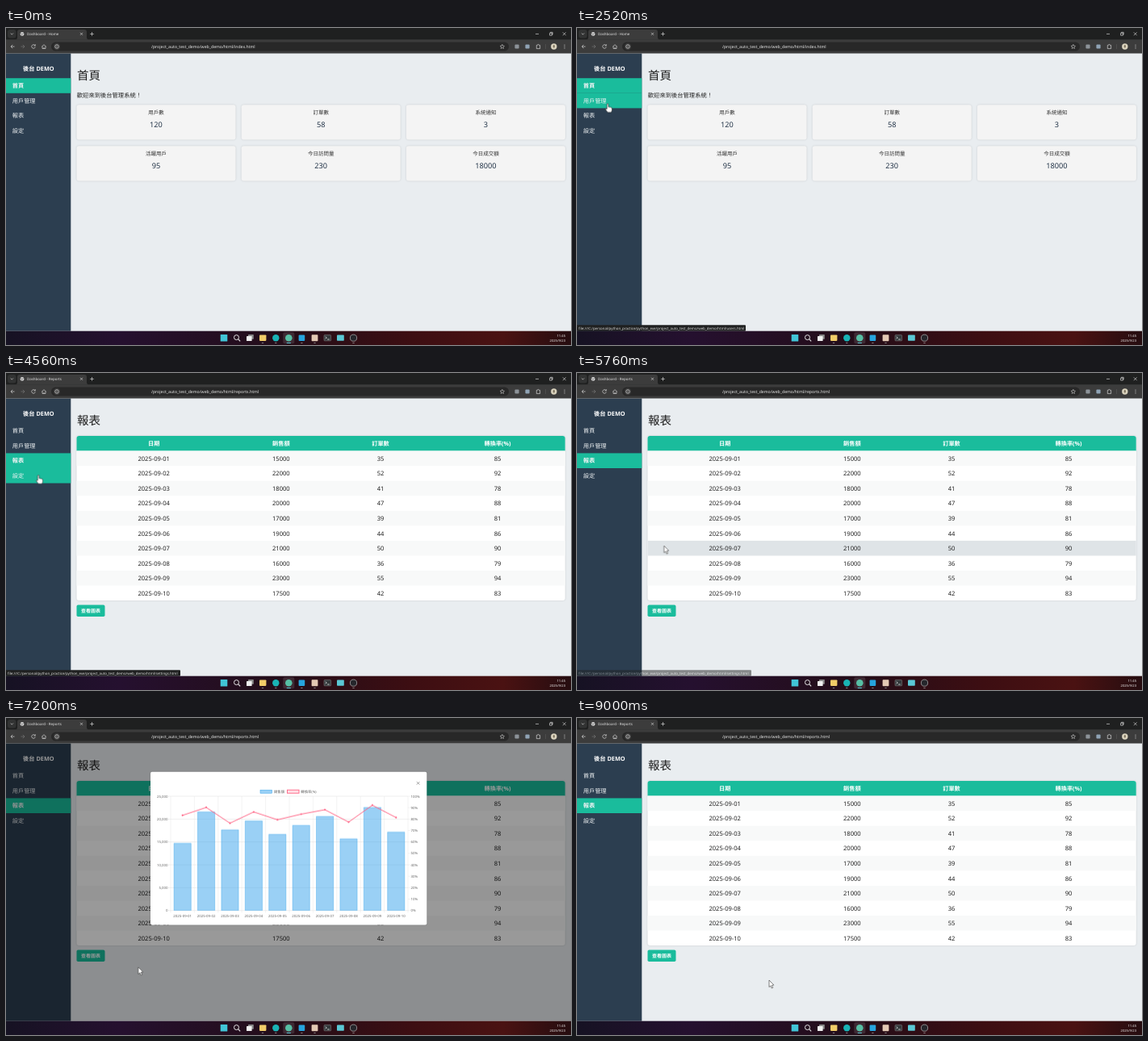
An HTML page for the animation above (9120 ms loop, 700 px wide and 393 px high).

```html
<!DOCTYPE html>
<html lang="zh-Hant">
<head>
<meta charset="utf-8">
<title>Dashboard demo</title>
<style>
  html, body { margin: 0; width: 100%; height: 100%; overflow: hidden; background: #e9edf0; }
  svg { display: block; width: 100vw; height: 100vh; }
  text { font-family: "Noto Sans", "Noto Sans CJK TC", "Noto Sans CJK", sans-serif; text-rendering: geometricPrecision; white-space: pre; }
  .shadow { filter: drop-shadow(0 .8px 1px rgba(0, 0, 0, .14)); }
  .plot { transform-origin: 0 238.7px; }
  .plot * { vector-effect: non-scaling-stroke; }
</style>
</head>
<body>
<svg id="stage" viewBox="0 0 700 393" preserveAspectRatio="none"></svg>
<script>
const LOOP = 9120;
const TEAL = '#1abc9c';
const styles = [];
const range = n => [...Array(n).keys()];

// Declares a looping track from [ms, css] keys and returns its style attribute.
function track(name, keys, timing = 'step-end') {
  const body = keys.map(([ms, css]) => `${(ms / LOOP * 100).toFixed(4)}%{${css}}`).join('');
  styles.push(`@keyframes ${name}{${body}}`);
  return `style="animation:${name} ${LOOP}ms ${timing} infinite"`;
}

// Visible only inside the given [from, to] spans.
function shown(name, ...spans) {
  const keys = [[0, 'opacity:0']];
  for (const [from, to] of spans) {
    keys.push([from, 'opacity:1']);
    if (to < LOOP) keys.push([to, 'opacity:0']);
  }
  return track(name, keys.filter(([ms], i) => i || spans[0][0] > 0));
}

const group = (attrs, ...parts) => `<g ${attrs}>${parts.flat().join('')}</g>`;
const rect = (x, y, w, h, fill, r = 0, more = '') =>
  `<rect x="${x}" y="${y}" width="${w}" height="${h}" fill="${fill}" rx="${r}" ${more}/>`;
const circle = (x, y, r, fill, more = '') => `<circle cx="${x}" cy="${y}" r="${r}" fill="${fill}" ${more}/>`;
const line = (d, color = '#d4d4d4', width = .7) =>
  `<path d="${d}" fill="none" stroke="${color}" stroke-width="${width}"/>`;
// Text centred vertically on y.
const text = (str, x, y, size, fill, anchor = 'start', weight = 400) =>
  `<text x="${x}" y="${(y + size * .37).toFixed(2)}" font-size="${size}" fill="${fill}" text-anchor="${anchor}" font-weight="${weight}">${str}</text>`;

const HOME_SPAN = [0, 3180];
const REPORT_SPAN = [3180, LOOP];
const LOAD_SPAN = [3180, 3400];

function browser() {
  const tabTitle = str => text(str, 26, 7.4, 4.45, '#e4e4e4');
  const path = page => text(`/project_auto_test_demo/web_demo/html/${page}.html`, 180, 23, 5.15, '#e6e6e6');
  return [
    rect(0, 0, 700, 15, '#1f2020'),
    rect(2, 2, 10.5, 10.5, '#323333', 3), line('M5.7 6.5l1.6 1.6l1.6-1.6'),
    '<path d="M11 14.5q3 0 3-3V5q0-3 3-3H97q3 0 3 3v6.5q0 3 3 3z" fill="#3c3c3c"/>',
    rect(0, 14.3, 700, 17.2, '#3c3c3c'),
    circle(20, 7.4, 2.4, '#d8d8d8'), line('M18 6.5l2 1l1.8-1M19 9.2l1.3-1.4', '#555', .6),
    group(shown('tabHome', HOME_SPAN), tabTitle('Dashboard - Home')),
    group(shown('tabLoad', LOAD_SPAN), tabTitle('reports.html')),
    group(shown('tabReports', [LOAD_SPAN[1], LOOP]), tabTitle('Dashboard - Reports')),
    line('M92 5.8l3 3m0-3l-3 3M104.2 7.4h4.6m-2.3-2.3v4.6'),
    line('M656 7.4h4M673.6 6.3h2.8v2.8h-2.8zM674.4 6.1v-.8h2.8v2.8h-.8M689.8 5.4l3.8 3.8m0-3.8l-3.8 3.8'),
    line('M10.5 23H6m2.2-2.2L6 23l2.2 2.2'),
    line('M18.5 23H23m-2.2-2.2L23 23l-2.2 2.2', '#777'),
    group(shown('reload', [0, LOAD_SPAN[0]], [LOAD_SPAN[1], LOOP]),
      line('M36 21.7a2.3 2.3 0 1 0 .3 1.8M36.3 20.2v1.8h-1.8')),
    group(shown('stop', LOAD_SPAN), line('M32.3 21.2l3.6 3.6m0-3.6l-3.6 3.6')),
    line('M45 22.5v3h4v-3M44.4 23l2.6-2.3l2.6 2.3M47 25.5v-1.6'),
    rect(56, 17.4, 567, 11.2, '#282828', 5.6),
    circle(63, 23, 4.2, '#3b3b3b'), circle(63, 23, 2.3, 'none', 'stroke="#d4d4d4" stroke-width=".7"'),
    line('M63 22.7v1.4M63 21.5v.6', '#d4d4d4', .6),
    group(shown('pathHome', HOME_SPAN), path('index')),
    group(shown('pathReports', REPORT_SPAN), path('reports')),
    line('M614.8 20.4l.8 1.7l1.8.2l-1.3 1.3l.3 1.8l-1.6-.9l-1.6.9l.3-1.8l-1.3-1.3l1.8-.2z', '#d4d4d4', .6),
    rect(630.4, 20.4, 5.2, 5.2, '#8d9399', 1), rect(643.4, 20.4, 5.2, 5.2, '#8fa3b5', 1),
    line('M657.3 21.3h1.2a.9.9 0 0 1 1.8 0h1.3v4.3h-4.3z'),
    line('M668.5 20v6', '#5a5a5a', .6),
    circle(678.8, 23, 3.7, '#d9d2bd'), rect(677.8, 21, 2, 3.6, '#7a705c', 1),
    range(3).map(i => circle(692, 21 + i * 2, .55, '#d4d4d4')),
  ];
}

function sidebar() {
  const items = ['首頁', '用戶管理', '報表', '設定'];
  const top = i => 62.2 + 18.6 * i;
  const label = (i, weight) => text(items[i], 7.8, top(i) + 9.4, 7.2, '#f1f4f5', 'start', weight);
  const bar = i => rect(0, top(i), 80.3, 18.6, TEAL);
  const active = (i, span) => group(shown(`active${i}`, span), bar(i), label(i, 700));
  const idle = (i, ...spans) => group(shown(`idle${i}`, ...spans), label(i, 400));
  return [
    rect(0, 31.5, 80.3, 344.2, '#2c3e50'),
    text('後台 DEMO', 40.3, 50, 7.3, '#fff', 'middle', 700),
    group(shown('hoverUsers', [2040, 2900]), bar(1)),
    group(shown('hoverSettings', [4420, 5400]), bar(3)),
    active(0, HOME_SPAN), idle(0, REPORT_SPAN),
    label(1, 400),
    idle(2, HOME_SPAN), active(2, REPORT_SPAN),
    label(3, 400),
  ];
}

const heading = str => text(str, 88, 59, 14.5, '#1c1c1c', 'start', 500);

function homePage() {
  const cards = [['用戶數', 120], ['訂單數', 58], ['系統通知', 3], ['活躍用戶', 95], ['今日訪問量', 230], ['今日成交額', 18000]];
  return group(shown('home', HOME_SPAN),
    heading('首頁'),
    text('歡迎來到後台管理系統！', 87.8, 83.2, 7.3, '#222'),
    cards.map(([label, value], i) => {
      const x = 87.5 + 204.2 * (i % 3), y = 95.2 + 51 * Math.floor(i / 3);
      return rect(x, y, 197, 43.3, '#f4f4f4', 3, 'class="shadow"') +
        text(label, x + 98.5, y + 9.6, 6.5, '#333', 'middle') +
        text(value, x + 98.5, y + 24, 9.2, '#25364a', 'middle');
    }));
}

const sales = [15, 22, 18, 20, 17, 19, 21, 16, 23, 17.5];
const orders = [35, 52, 41, 47, 39, 44, 50, 36, 55, 42];
const rates = [85, 92, 78, 88, 81, 86, 90, 79, 94, 83];
const dates = range(10).map(i => `2025-09-${String(i + 1).padStart(2, '0')}`);

function reportPage() {
  const columns = [183.2, 340.8, 464, 609];
  const rowTop = i => 96.6 + 18.55 * i;
  const cells = (values, y, size, fill, weight) =>
    values.map((v, c) => text(v, columns[c], y, size, fill, 'middle', weight));
  // Times at which the pointer enters each row from the fifth on.
  const enters = [5595, 5632, 5728, 5816, 5900, 5983, 6066];
  return group(shown('reports', REPORT_SPAN),
    heading('報表'),
    rect(87.5, 78, 605.2, 204.1, '#fff', 3, 'class="shadow"'),
    `<path d="M87.5 96.6V81q0-3 3-3H689.7q3 0 3 3V96.6z" fill="${TEAL}"/>`,
    cells(['日期', '銷售額', '訂單數', '轉換率(%)'], 87.4, 7.2, '#fff', 700),
    range(5).map(i => rect(87.5, rowTop(i * 2), 605.2, 18.55, '#f8f9f9')),
    range(6).map(i => group(shown(`row${i}`, [enters[i], enters[i + 1]]),
      rect(87.5, rowTop(i + 4), 605.2, 18.55, '#dfe4e7'))),
    dates.map((d, i) => cells([d, sales[i] * 1000, orders[i], rates[i]], rowTop(i) + 9.4, 7.55, '#222').join('')),
    rect(87.5, 287.6, 35, 14.4, TEAL, 1.8),
    group(shown('buttonHover', [6090, 7020]), rect(87.5, 287.6, 35, 14.4, '#16a085', 1.8)),
    text('查看圖表', 105, 295, 6, '#fff', 'middle', 700));
}

function chartModal() {
  const base = 238.7, height = 141.7, left = 204, step = 29.4;
  const label = (str, x, y, anchor) => text(str, x, y, 4.35, '#666', anchor);
  const mid = i => left + step * (i + .5);
  const points = rates.map((r, i) => [mid(i).toFixed(1), (base - height * r / 100).toFixed(1)]);
  const grow = track('grow', [
    [0, 'transform:scaleY(.001)'],
    [6480, 'transform:scaleY(.001);animation-timing-function:cubic-bezier(.165,.84,.44,1)'],
    [7480, 'transform:scaleY(1)'], [LOOP, 'transform:scaleY(1)'],
  ]);
  return group(shown('modal', [6420, 7690]),
    rect(0, 31.5, 700, 344.2, 'rgba(0,0,0,.4)'),
    rect(179, 66.8, 342.3, 189.6, '#fff', 2, 'class="shadow"'),
    line('M508.8 79l3.6 3.6m0-3.6l-3.6 3.6', '#777', .7),
    rect(315, 89.2, 14.5, 4, '#9ad0f5', 0, 'stroke="#36a2eb" stroke-width=".5"'),
    label('銷售額', 332, 91.2),
    rect(348.5, 89.2, 14.5, 4, '#ffe0e6', 0, 'stroke="#ff6384" stroke-width=".9"'),
    label('轉換率(%)', 365.3, 91.2),
    range(6).map(i => {
      const y = base - height * i / 5;
      return line(`M${left - 3} ${y}H498`, '#dedede', .5) +
        label((i * 5000).toLocaleString('en-US'), 200.5, y, 'end');
    }),
    range(11).map(i => line(`M${left + step * i} 97V241.5`, '#e4e4e4', .45) +
      label(`${i * 10}%`, 501.6, base - height * i / 10) +
      line(`M498 ${base - height * i / 10}h2.7`, '#e4e4e4', .45)),
    dates.map((d, i) => label(d, mid(i), 245, 'middle')),
    group(`class="plot" ${grow}`,
      sales.map((s, i) => rect(mid(i) - 10.6, base - height * s / 25, 21.2, height * s / 25,
        'rgba(54,162,235,.5)', 0, 'stroke="#36a2eb" stroke-width=".4"')),
      line(`M${points.join('L')}`, '#ff6384', 1),
      `<path d="${points.map(p => `M${p}h.01`).join('')}" stroke="#ff6384" stroke-width="2.2" stroke-linecap="round"/>`));
}

function statusBar() {
  const bubble = (page, width) =>
    rect(-2, 368.2, width + 2, 7.5, '#1f2020', 1) +
    text(`file:///C:/personal/python_practice/python_exe/project_auto_test_demo/web_demo/html/${page}.html`, 2, 371.9, 4.4, '#dcdcdc');
  const fade = track('statusSettings', [
    [0, 'opacity:0'], [4500, 'opacity:1'],
    [5640, 'opacity:1;animation-timing-function:linear'], [5880, 'opacity:0'], [LOOP, 'opacity:0'],
  ]);
  return [
    group(shown('statusUsers', [2280, 3000]), bubble('users', 209)),
    group(shown('statusReports', [3000, 4500]), bubble('reports', 214.5)),
    group(fade, bubble('settings', 216)),
  ];
}

function taskbar() {
  const y = 384.2;
  const dot = x => rect(x - 1.3, 390.3, 2.6, .8, '#a5a5a5', .4);
  return [
    `<linearGradient id="bar">
      <stop offset="0" stop-color="#161223"/><stop offset=".2" stop-color="#25102f"/>
      <stop offset=".5" stop-color="#240d18"/><stop offset=".72" stop-color="#3d0e12"/>
      <stop offset=".88" stop-color="#4a1212"/><stop offset="1" stop-color="#260d10"/>
    </linearGradient>`,
    rect(0, 375.7, 700, 17.3, 'url(#bar)'),
    rect(265.7, 379.9, 8.6, 8.6, '#41c4d6', .6),
    circle(285.5, 383.6, 3, 'none', 'stroke="#e8e8e8" stroke-width="1"'), line('M287.8 385.9l2.4 2.4', '#e8e8e8', 1.1),
    rect(300, 380, 6.8, 5.8, '#8a8a8a', .6), rect(298, 382, 6.6, 6, '#f0f0f0', .6),
    rect(314, 380.5, 8.4, 7.4, '#f2cc68', .8),
    circle(334.3, y, 4.2, '#19b3b5'),
    rect(343.3, 377.2, 14, 14, 'rgba(255,255,255,.12)', 2),
    circle(350.3, y, 4.3, '#57bfa4'),
    rect(362.6, 380.4, 7.6, 7.6, '#26a3dd', 1),
    rect(378.6, 380.2, 7.8, 8, '#e3c9b4', .8),
    rect(394, 380.6, 8.6, 7.2, '#33383b', .8, 'stroke="#aaa" stroke-width=".4"'),
    line('M395.7 382.6l1.6 1.4l-1.6 1.4M398.2 386h2.5', '#fff', .7),
    rect(410, 380.6, 8.8, 7.2, '#5ac7d4', .8),
    circle(430.5, y, 4.1, '#25262b', 'stroke="#b9b9b9" stroke-width=".7"'),
    [318, 334.3, 366.4, 382.5, 430.5].map(dot),
    rect(347.6, 390.1, 5.4, 1, '#58c6d8', .5),
    text('11:45', 693, 381.2, 4.1, '#eee', 'end'),
    text('2025/9/23', 693, 387.3, 4.1, '#eee', 'end'),
  ];
}

function pointer() {
  const stops = [
    [0, 230, 230], [1200, 230, 230], [1500, 120, 130], [1800, 36.5, 80], [2100, 38, 91], [2760, 38, 95],
    [3080, 38.7, 112.5], [4200, 39, 113.5], [4500, 40, 126], [5200, 42, 130], [5520, 82, 168],
    [5760, 107.8, 214], [6120, 110.8, 294], [6400, 110.8, 296.3], [7000, 110.8, 296.3],
    [7300, 190, 315], [7560, 238, 325], [LOOP, 238, 325],
  ];
  const move = track('move', stops.map(([ms, x, y]) => [ms, `transform:translate(${x}px,${y}px)`]), 'linear');
  const hand = 'M-.9 .8Q0-.6.9.8V4.4Q1.9 3.7 2.6 4.7Q3.6 4.1 4.1 5.1Q5.4 4.8 5.4 6.2V8.3Q5.2 9.8 4.3 11H.2Q-1.5 9.3-2.9 6.9Q-2.6 5.7-.9 7z';
  const arrow = 'M0 0V8.6L1.9 6.9L3.2 10L4.7 9.4L3.4 6.3L5.9 6.1z';
  const shape = (d, fill, stroke) =>
    `<path d="${d}" fill="${fill}" stroke="${stroke}" stroke-width=".6" stroke-linejoin="round"/>`;
  return group(move,
    group(shown('arrow', [1200, 1640], [5500, 6090], [6420, LOOP]), shape(arrow, '#fff', '#333')),
    group(shown('hand', [1640, 5500], [6090, 6420]), shape(hand, '#fff', '#222')));
}

document.getElementById('stage').innerHTML = [
  rect(0, 0, 700, 393, '#e9edf0'),
  homePage(), reportPage(), sidebar(), chartModal(), browser(), statusBar(), taskbar(), pointer(),
].flat(2).join('');
const sheet = document.createElement('style');
sheet.textContent = styles.join('\n');
document.head.append(sheet);
</script>
</body>
</html>
```
